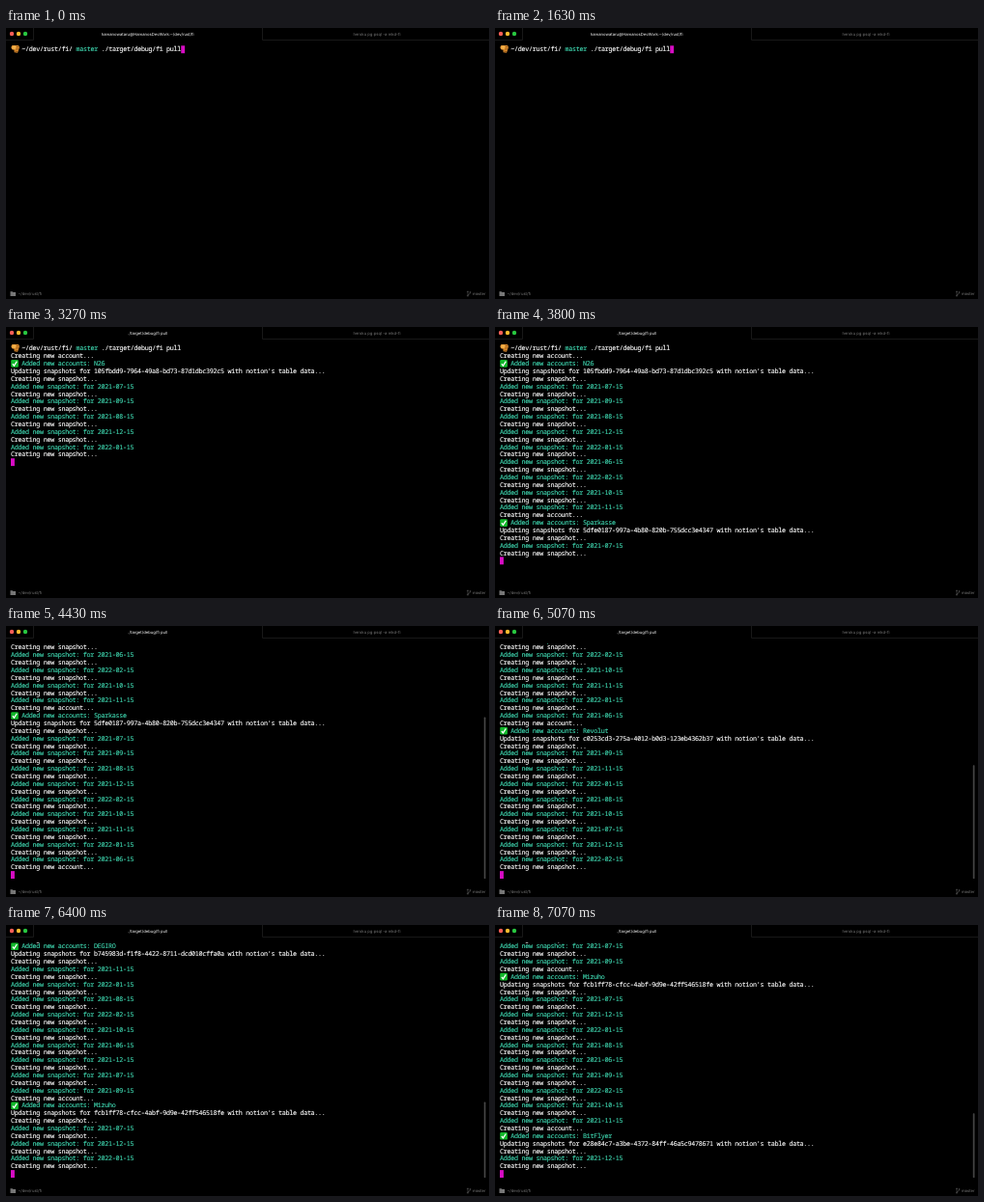
An HTML page that plays this animation: 500x281 px, repeating every 7110 ms.

```html
<!DOCTYPE html>
<html lang="en">
<head>
<meta charset="utf-8">
<title>Terminal</title>
<style>
  html, body { margin: 0; width: 100%; height: 100%; overflow: hidden; background: #000; }
  svg { display: block; width: 100vw; height: 100vh; }
  text { text-rendering: geometricPrecision; white-space: pre; }
  .mono { font: 6.7px "Noto Sans Mono", "DejaVu Sans Mono", monospace; letter-spacing: -.27px; }
  .mono text { fill: #fff; stroke: #fff; stroke-width: .12; }
  .mono .teal { fill: #40dcb4; stroke: #40dcb4; }
  .ui { font: 4.2px Inter, Roboto, sans-serif; fill: #777; }
  .ui.on { fill: #fff; }
  .mid { text-anchor: middle; }
  .end { text-anchor: end; }
</style>
</head>
<body>
<svg viewBox="0 0 500 281" preserveAspectRatio="none">
  <defs>
    <clipPath id="screen"><rect y="18" width="500" height="245"/></clipPath>
    <g id="bread">
      <path d="M5.4 20.6Q5.2 17.6 8.6 17.5L11.4 17.5Q14.4 18.2 13.7 21L13 23 12 25.8 8.6 25.2 8.4 22.8Q5.6 23 5.4 20.6Z" fill="#d98a2b"/>
      <path d="M6 20.2Q6.4 18.2 8.8 18.3L10.6 19.2 9.6 22Q6.4 22.6 6 20.2Z" fill="#f3b04a"/>
      <path d="M10.8 19.6l2-.3M10.4 22l2.4-.2M9.4 24.2l2.4.4" stroke="#7a4312" stroke-width=".7"/>
    </g>
    <g id="check">
      <rect x="5.2" y=".1" width="7.7" height="7.7" rx="1.2" fill="#12b92b"/>
      <path d="M6.8 4.2l1.6 1.9 2.9-4.4" fill="none" stroke="#fff" stroke-width="1.3"/>
    </g>
  </defs>
  <rect width="500" height="281"/>

  <path d="M0 12.5H28.5V0M265.5 0V12.5H500" fill="none" stroke="#181818"/>
  <circle cx="6" cy="6" r="2.2" fill="#ff5f57"/>
  <circle cx="13" cy="6" r="2.2" fill="#febc2e"/>
  <circle cx="20" cy="6" r="2.2" fill="#28c840"/>
  <text id="title" class="ui on mid" x="146.7" y="7.5"></text>
  <text class="ui mid" x="384" y="7.5">heroku pg:psql -a mkd-fi</text>

  <g clip-path="url(#screen)">
    <g id="log" class="mono">
      <use href="#bread"/>
      <text y="24.4"><tspan x="16.25">~/dev/rust/fi/</tspan><tspan x="72.5" class="teal">master</tspan><tspan x="98.75">./target/debug/fi pull</tspan></text>
    </g>
    <rect id="cursor" width="3.9" height="7.9" fill="#d80cc4"/>
  </g>
  <rect id="thumb" x="494.8" width="1.7" rx=".6" fill="#444"/>

  <path d="M4.5 273.2h2.1l.7.8h2.7v4H4.5z" fill="#777"/>
  <text class="ui" x="12.5" y="277">~/dev/rust/fi</text>
  <g fill="none" stroke="#666" stroke-width=".5">
    <path d="M478 273.2v4.8M478 276.6q2.6 0 2.6-2.6"/>
    <circle cx="478" cy="273.3" r=".5"/><circle cx="478" cy="277.8" r=".5"/><circle cx="480.6" cy="273.9" r=".5"/>
  </g>
  <text class="ui end" x="496.5" y="277">master</text>

  <path id="pointer" d="M-1.8 -3.4Q0 -3.4 0 -2.4Q0 -3.4 1.8 -3.4M0 -2.6V2.6M-1.8 3.4Q0 3.4 0 2.4Q0 3.4 1.8 3.4M-1 1h2" fill="none" stroke="#bbb" stroke-width=".8"/>
</svg>
<script>
const LOOP = 7110, ENTER = 2100;
const LEFT = 5, TOP = 18.3, CELL = 3.75, PITCH = 7.86, ROWS = 31;
const TRACK = { top: 19, bottom: 262 };
const NS = "http://www.w3.org/2000/svg";
const $ = id => document.getElementById(id);

// Months of the snapshots, in the order they finish
const accounts = [
  ["N26", "105fbdd9-7964-49a8-bd73-87d1dbc392c5", "07 09 08 12 01 06 02 10 11"],
  ["Sparkasse", "5dfe0187-997a-4b80-820b-755dcc3e4347", "07 09 08 12 02 10 11 01 06"],
  ["Revolut", "c0253cd3-275a-4012-b0d3-123eb4362b37", "09 11 01 08 10 07 12 02 06"],
  ["DEGIRO", "b745983d-f1f8-4422-8711-dcd010cffa0a", "11 01 08 02 10 06 12 07 09"],
  ["Mizuho", "fcb1ff78-cfcc-4abf-9d9e-42ff546518fe", "07 12 01 08 06 09 02 10 11"],
  ["BitFlyer", "e28e84c7-a3be-4372-84ff-46a5c9478671", "12"]
];

// [reply number, ms]: replies arrive evenly between these points
const pace = [[0, 2770], [9, 3505], [12, 3770], [29, 5045], [37, 5740], [44, 6365], [52, 7035]];

function replyTime(k) {
  const i = Math.max(1, pace.findIndex(p => p[0] >= k));
  const [k0, t0] = pace[i - 1], [k1, t1] = pace[i];
  return t0 + (t1 - t0) * (k - k0) / (k1 - k0);
}

const lines = [];
let reply = 0;

function add(tag, attrs, parent) {
  const el = document.createElementNS(NS, tag);
  for (const name in attrs) el.setAttribute(name, attrs[name]);
  return parent.appendChild(el);
}

function print(text, style = "", checked = false) {
  const y = TOP + PITCH * (lines.length + 1);
  const el = add("g", {}, $("log"));
  if (checked) add("use", { href: "#check", y }, el);
  const x = LEFT + (checked ? 3 * CELL : 0);
  add("text", { x, y: y + 6.1, class: style }, el).textContent = text;
  lines.push({ el, at: replyTime(reply) });
}

print("Creating new account...");
accounts.forEach(([name, id, months], a) => {
  reply++;
  print("Added new accounts: " + name, "teal", true);
  print(`Updating snapshots for ${id} with notion's table data...`);
  print("Creating new snapshot...");
  months.split(" ").forEach((month, i) => {
    reply++;
    print(`Added new snapshot: for ${month < "06" ? 2022 : 2021}-${month}-15`, "teal");
    const last = i === 8 && a < accounts.length - 1;
    print(`Creating new ${last ? "account" : "snapshot"}...`);
  });
});

function drawPointer(t) {
  const shown = t >= 5660 && t < 6060;
  const fall = Math.max(0, (t - 5790) / 270);
  $("pointer").style.display = shown ? "" : "none";
  $("pointer").setAttribute("transform", `translate(328 ${213.5 + 72 * fall * fall})`);
}

function draw(t) {
  const running = t >= ENTER;
  let count = 0;
  for (const line of lines) {
    const shown = t >= line.at;
    line.el.style.display = shown ? "" : "none";
    if (shown) count++;
  }
  const row = running ? count + 1 : 0;
  const scroll = Math.max(0, row - ROWS + 1);
  $("log").setAttribute("transform", `translate(0 ${-scroll * PITCH})`);
  $("cursor").setAttribute("x", running ? LEFT : LEFT + 47 * CELL);
  $("cursor").setAttribute("y", TOP + (row - scroll) * PITCH);
  $("title").textContent = running ? "./target/debug/fi pull" : "hamanowataru@HamanosDevWork:~/dev/rust/fi";

  const size = (TRACK.bottom - TRACK.top) * ROWS / (ROWS + scroll);
  $("thumb").style.display = scroll ? "" : "none";
  $("thumb").setAttribute("y", TRACK.bottom - size);
  $("thumb").setAttribute("height", size);
  drawPointer(t);
}

const start = performance.now();
function tick() {
  draw((performance.now() - start) % LOOP);
  requestAnimationFrame(tick);
}
tick();
</script>
</body>
</html>
```
